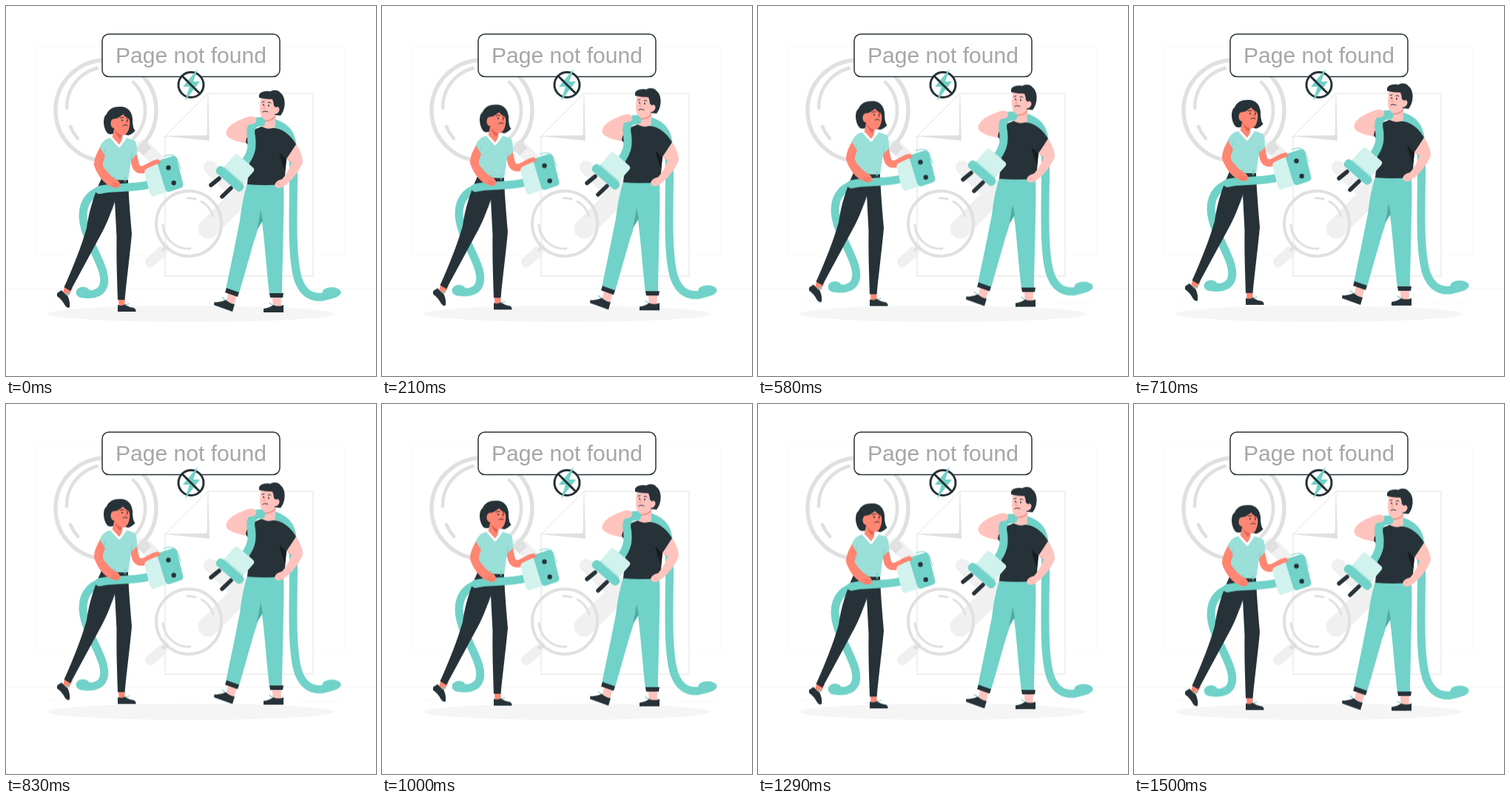
Write an HTML page that moves like this. It is 500 px wide and 500 px high and loops after 1540 ms.

```html
<!DOCTYPE html>
<html lang="en">
<head>
<meta charset="utf-8">
<title>Page not found</title>
<style>
  html, body { margin: 0; width: 100%; height: 100%; overflow: hidden; background: #fff; }
  svg { display: block; width: 100%; height: 100%; }
  .float { animation: float 770ms linear -60ms infinite alternate; }
  @keyframes float {
    from { transform: translateY(.8px); }
    to { transform: translateY(-9.2px); }
  }
  .line { fill: none; stroke-linecap: round; stroke-linejoin: round; }
  .grey { stroke: #e0e0e0; }
  .pale { stroke: #f0f0f0; }
  .dark { fill: #263238; }
  .ink { stroke: #263238; }
  .teal { fill: #70d2c8; }
  .cord { stroke: #70d2c8; }
  .mint { fill: #d2f2ee; }
  .her { fill: #ff8672; }
  .his { fill: #ffc3bd; }
  text { font: 30.1px "Liberation Sans", Arial, sans-serif; fill: #a6a6a6; }
</style>
</head>
<body>
<svg viewBox="0 0 500 500">
  <!-- backdrop -->
  <g class="line" stroke="#f9f9f9">
    <rect x="39.500" y="55.500" width="418" height="282"/>
    <path d="M54 399.500h30M398 402.500h58"/>
    <path d="M0 382.500H500" stroke="#f3f3f3"/>
  </g>

  <!-- sheet with folded corner -->
  <path d="M273 118H415V365H215V176Z" fill="#fff" class="grey"/>
  <path d="M273 118L275 182L215 176Z" fill="#e0e0e0"/>
  <path d="M273 118L272 175L215 176Z" fill="#fff" class="grey" stroke-width=".8"/>

  <!-- magnifiers -->
  <g class="line grey">
    <path class="pale" stroke-width="18" d="M186 190L222 226M276 218L304 246"/>
    <path class="pale" stroke-width="27" d="M273 301L327 247"/>
    <path stroke-width="15" stroke-linecap="butt" d="M181 187L191 197"/>
    <circle cx="135" cy="141" r="68" stroke-width="5.500"/>
    <path stroke-width="4.500" d="M82 138A55 55 0 0 1 123 84M87 163Q91 172 97 179M172 103A53 53 0 0 1 172 179"/>
    <path class="pale" stroke-width="14" d="M211 332L195 346"/>
    <path stroke-width="5" d="M217 325L213 329"/>
    <circle cx="247" cy="294" r="44" stroke-width="4"/>
    <path stroke-width="3" d="M212 296A35 35 0 0 0 249 328M245 259.500Q251 259.500 256 261M264 264A35 35 0 0 1 280 284"/>
  </g>

  <ellipse cx="250" cy="416" rx="194" ry="11" fill="#f5f5f5"/>

  <g class="float">
    <!-- woman -->
    <g>
      <path class="line cord" stroke-width="11" d="M140 246C114 250 104 264 104 284C105 310 124 335 131 359C136 377 131 391 108 389.500"/>
      <ellipse class="teal" cx="104" cy="387" rx="9.500" ry="7.500"/>
      <path class="her" d="M80 377L90 381L85 391L77 387ZM152 393h8.500v13h-8Z"/>
      <path class="dark" d="M69 388L75 384Q79 389 83 391Q87 399 86 407Q83 409 80 405Q76 397 69 392ZM151 404Q157 406 161 403Q165 407 173 408Q176 410 175.500 413H151Z"/>
      <path class="line cord" stroke-width="1.200" d="M81 390l4-3M162 404l4-2"/>
      <path class="dark" d="M129 233L165 237C166 262 168 285 170 308C167 340 163 370 160.500 397H151C150 366 149 338 149.500 312L147 264C141 282 135 297 127 311L87 385L78.500 380C92 350 102 324 109 300C112 277 119 255 129 233Z"/>
      <path class="line" stroke="#455a64" d="M147 264L143 275"/>

      <path class="dark" d="M138 172.500C131 166 130 150 136 146C139 138 147 135.500 155 136C165 136 170 143 171 152C171 160 172 166 174.500 168.500C170 173 166 175 162 174L147 172Q142 174 138 172.500Z"/>
      <path class="her" d="M147 162L158 170L157 180L153 190L143 180Z"/>
      <path class="her" d="M145 152.500C149 153 156 149 159 145C162 149 167.500 151 167.500 157C167 165 165 173 159 174.500C152 175 148 170 147 165.500C140 165 140 154 145 152.500Z"/>
      <path class="dark" d="M157 144C161 141 167 143 169 150C169 159 170 165 174.500 168.500Q169 174 164 175C168 166 169 157 166 152Q160 150 157 144Z"/>
      <path fill="#e8604f" d="M147 167Q151 173 157 175L154 179Q149 174 147 167Z"/>
      <g class="line ink" stroke-width="1">
        <path d="M154 151.500Q156 149.500 159 150.500M163 152l2 1M158 161.500Q161 159.500 164 161.500"/>
        <path stroke="#e8604f" d="M162 155l2 3.500h-2"/>
      </g>
      <ellipse class="dark" cx="157" cy="154.500" rx=".9" ry="1.300"/>
      <ellipse class="dark" cx="164" cy="155" rx=".8" ry="1.200"/>

      <path class="line" stroke="#ff8672" stroke-width="10" d="M171 197L175 215Q178 224 188 220L203 213"/>
      <path fill="#9adfd8" d="M142 178C133 179 128 186 126 193L132 203L131 233Q147 237 165 236L169 208L177 200C177 192 177 186 174 182Q168 179 162 178L153 191Z"/>
      <path class="line" stroke="#fff" stroke-width="3" d="M143 178.500L153 189.500L161 178.500"/>
      <path class="line" stroke="#7fcfc6" stroke-width=".8" d="M132 202l2-9M169 208l1-10"/>
      <path class="dark" d="M130 231Q147 236 165 235V240Q147 241 128 237Z"/>
      <path class="line cord" stroke-width="1.500" d="M147 231v6M161 231v6"/>

      <path class="line cord" stroke-width="11" d="M126 248.500C142 243.500 168 247.500 194 241"/>
      <path class="her" d="M127 191L134 203C131 210 131 214 132 218C138 226 145 233 152 236L155 242Q152 247 146 245.500L138 242C129 236 122 225 119 215C119 206 123 198 127 191Z"/>
      <path class="line" stroke="#e8604f" stroke-width=".8" d="M144 239l8 2M143 242l7 2"/>

      <path class="mint" d="M190 219L207 211L220 250L200 257Q196 258 194 252L188 228Q186 222 190 219Z"/>
      <path class="teal" d="M209 208L224 203Q229 202 231 207L239 239Q241 244 236 246L221 251Q217 252 215 247L205 214Q204 210 209 208Z"/>
      <circle class="dark" cx="219.500" cy="218.500" r="3.200"/>
      <circle class="dark" cx="226.700" cy="239" r="3.200"/>
      <path class="line cord" stroke-width="1" d="M213 203Q227 198 231 206L236 220"/>
      <path class="her" d="M187 215L198 209L205 207Q210 209 208 213L203 214L196 217L188 221Z"/>
    </g>

    <!-- man -->
    <g>
      <path class="line cord" stroke-width="11" d="M338 156C356 154 374 160 382 172C389 183 388.500 200 388.500 240C387.500 300 387 345 395 370C402 389 413 394.500 428 393Q437 391 445 388"/>
      <ellipse class="teal" cx="440" cy="387" rx="12.500" ry="7"/>
      <path class="his" d="M301 386L312 390L308 404L297 400ZM360 391h12l-.5 16h-11Z"/>
      <path class="dark" d="M281.500 400Q290 401 297 397Q302 402 309 403L306 413L281 404ZM348 409Q356 408 361 404Q368 407 375 404V414H348Z"/>
      <path class="line cord" stroke-width="1.200" d="M296 397l-4-3M360 404l-4-3"/>
      <path class="teal" d="M326 240H375C376 270 375 295 373 390H356C352 355 350 325 347 300L344 276C343 290 341 302 335 318L315 388L297 383C304 350 310 320 316 290Q319 262 326 240Z"/>
      <path fill="#53aaa1" d="M344 275L347 290L339 303Q342 290 344 275Z"/>
      <path class="dark" d="M298 381L315 387L313 393L296 387ZM356 388H375L374 394H357Z"/>

      <path class="his" d="M337 151C333 148 328 149 322 151.500C310 156 301 161 298 169C296 176 301 181 326 186L331 172L328 166L338 158Z"/>
      <path class="dark" d="M345 163L335 167C328 171 325 177 324 184L328 189C330 205 328 222 326 241Q350 243 376 241L379 207L392 187C386 176 376 167 364 165Z"/>
      <path fill="#151d21" d="M369 198L379 207L377 222Q372 211 369 198Z"/>
      <path class="his" d="M348 148L364 148L364 162C360 167 351 167 345 162Z"/>
      <path fill="#f0998f" d="M349 154Q358 154 364 148L364 151Q358 157 349 156Z"/>
      <path class="dark" d="M342.500 124C340 118 347 113.500 357 115.500C361 113 368 113 371 117.500C378 122 379 139 371 148L360 147L352 124Z"/>
      <path class="his" d="M345 122Q353 126 361 124L364 137C367 134 371 138 369 142Q367 146 363 146C361 152 355 155 350 153C342 151 342 138 345 122Z"/>
      <path class="dark" d="M342.500 124Q340 119 347 117L367 120L366 137L362 135Q362 130 360 126Q350 126 342.500 124Z"/>
      <path class="line ink" stroke-width="1" d="M346 130l3-1M354 130.500Q356 129 358 131M347 143Q350 141 354 143"/>
      <path class="line" stroke="#f0998f" stroke-width="1" d="M350 134l-2 5h2"/>
      <ellipse class="dark" cx="348" cy="133.500" rx=".8" ry="1.200"/>
      <ellipse class="dark" cx="355" cy="134.500" rx=".9" ry="1.300"/>

      <path class="his" d="M392 187C397 194 401 203 401 211C396 224 386 236 376 243C372 247 364 247 363 242Q364 236 373 234C379 228 384 218 386 211L379 207Z"/>
      <path class="line" stroke="#f0998f" stroke-width=".8" d="M367 239l4 4M379 207l5 3"/>
      <path class="line cord" stroke-width="11" d="M345 157C332 157 329 166 331.500 177C333 190 332 198 324 210"/>
      <path class="his" d="M324 151Q333 146.500 338 152Q339 157 335 159L326 161Z"/>

      <path class="line ink" stroke-width="5.500" d="M288 233L277 242M304 246L292 257.500"/>
      <g transform="translate(308 225) rotate(41)">
        <rect class="mint" x="-15" y="-22" width="34" height="32" rx="4"/>
        <rect x="-15" y="2" width="34" height="4" fill="#aee6df"/>
        <rect class="teal" x="-21" y="4" width="45" height="12" rx="5"/>
      </g>
    </g>
  </g>

  <!-- message -->
  <rect x="130" y="38" width="240" height="57.500" rx="9" fill="#fff" class="ink" stroke-width="1.500"/>
  <text x="250" y="77" text-anchor="middle">Page not found</text>
  <circle cx="250" cy="106.500" r="17" fill="#fff" class="ink" stroke-width="3"/>
  <path class="line ink" stroke-width="3" d="M238 94.500L262 118.500"/>
  <path class="teal" d="M259 85L239 109H248L242 128L262 102H253Z"/>
  <path class="line ink" stroke-width="3" d="M243 99.500L257 113.500"/>
</svg>
</body>
</html>
```
